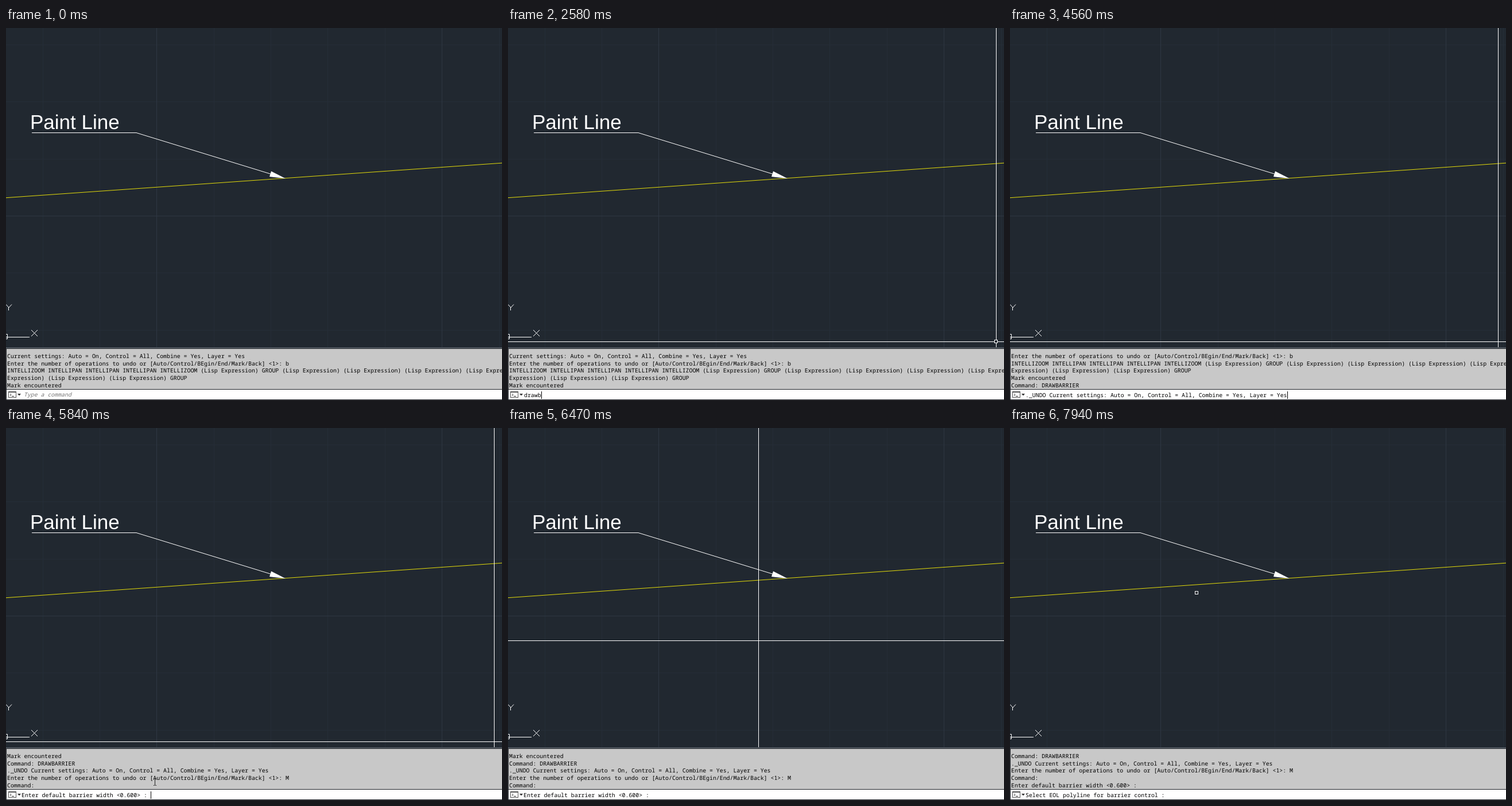
Write an HTML page with a canvas that moves like this. It is 864 px wide and 648 px high and loops after 8 s.

```html
<!DOCTYPE html>
<html lang="en">
<head>
<meta charset="utf-8">
<title>Draw barrier command</title>
<style>
  html, body { margin: 0; width: 100%; height: 100%; overflow: hidden; background: #212830; }
  canvas { display: block; }
</style>
</head>
<body>
<canvas id="stage" width="864" height="648"></canvas>
<script>
const ctx = document.getElementById('stage').getContext('2d');
const W = 864, VIEW_H = 556, LOOP = 8000, STEP = 70;
const MONO = '9.87px "Noto Sans Mono", "DejaVu Sans Mono", monospace';

const SETTINGS = 'Current settings: Auto = On, Control = All, Combine = Yes, Layer = Yes';
const UNDO = 'Enter the number of operations to undo or [Auto/Control/BEgin/End/Mark/Back] <1>: ';
const WIDTH_PROMPT = 'Enter default barrier width <0.600> : ';
const LISP = '(Lisp Expression) ';
const HISTORY = [
  SETTINGS,
  UNDO + 'b',
  'INTELLIZOOM INTELLIPAN INTELLIPAN INTELLIPAN INTELLIZOOM ' + LISP + 'GROUP ' + LISP.repeat(4),
  'Expression) ' + LISP.repeat(2) + 'GROUP',
  'Mark encountered',
  'Command: DRAWBARRIER',
  '._UNDO ' + SETTINGS,
  UNDO + 'M',
  'Command:',
  WIDTH_PROMPT
];
const KEY_TIMES = [1780, 1980, 2180, 2310, 2580, 2710, 2970, 3170, 3370, 3470, 3570];
const PARKED = [850, 546];
const PICK_START = [438, 367];

function rect(x, y, w, h, color) {
  ctx.fillStyle = color;
  ctx.fillRect(x, y, w, h);
}

function path(points, color = '#fff', fill = false) {
  ctx.beginPath();
  points.forEach(([x, y]) => ctx.lineTo(x, y));
  ctx.fillStyle = ctx.strokeStyle = color;
  ctx.lineWidth = 1;
  if (fill) ctx.fill(); else ctx.stroke();
}

function disc(x, y, r, color) {
  ctx.beginPath();
  ctx.arc(x, y, r, 0, 7);
  ctx.fillStyle = color;
  ctx.fill();
}

function text(string, x, y, color = '#000', font = MONO) {
  ctx.font = font;
  ctx.fillStyle = color;
  ctx.fillText(string, x, y);
}

const mix = (a, b, p) => a.map((v, i) => Math.round(v + (b[i] - v) * p));
const ease = p => p * p * (3 - 2 * p);

function drawGrid() {
  rect(0, 0, W, VIEW_H, '#212830');
  const line = (i, vertical, major) => {
    const at = Math.round((vertical ? 63.7 : 29) + i * 99.35);
    const color = major ? '#2e3742' : '#252d37';
    if (vertical) rect(at, 0, 1, VIEW_H, color);
    else rect(0, at, W, 1, color);
  };
  for (const major of [false, true]) {
    for (let i = 0; i < 9; i++) if ((i % 5 === 2) === major) line(i, true, major);
    for (let i = 0; i < 6; i++) if ((i === 3) === major) line(i, false, major);
  }
}

function drawDrawing() {
  path([[0, 295.7], [W, 235.2]], '#e2da0a');
  text('Paint Line', 42, 176, '#fff', '35px "Liberation Sans", Arial, sans-serif');
  path([[45, 182.5], [227, 182.5], [465, 255.5]]);
  path([[462, 249.5], [459, 259], [487, 262.3]], '#fff', true);
  // axis icon
  path([[0, 481.5], [5, 487], [10, 481.5]]);
  path([[4.5, 487], [4.5, 492]]);
  path([[44, 526], [55, 537]]);
  path([[55, 526], [44, 537]]);
  path([[0, 538.5], [41, 538.5]]);
  path([[0, 533.5], [2.5, 533.5], [2.5, 541.5], [0, 541.5]]);
}

function drawPickbox([x, y]) {
  ctx.strokeStyle = '#fff';
  ctx.lineWidth = 1;
  ctx.strokeRect(x - 2.5, y - 2.5, 5, 5);
}

function drawCrosshair([x, y], withBox) {
  const gap = withBox ? 3 : 0;
  rect(x, 0, 1, y - gap, '#fff');
  rect(x, y + gap, 1, VIEW_H - y - gap, '#fff');
  rect(0, y, x - gap, 1, '#fff');
  rect(x + gap, y, W - x - gap, 1, '#fff');
  if (withBox) drawPickbox([x, y]);
}

function drawPanel(first) {
  rect(0, 556, W, 1, '#3b434c');
  rect(0, 557, W, 1, '#666c73');
  rect(0, 558, W, 90, '#20242a');
  rect(1, 559, W, 70, '#c8c8c8');
  rect(1, 630, W, 17, '#fff');
  HISTORY.slice(first, first + 5).forEach((s, i) => text(s, 2, Math.round(575 + 12.65 * i)));
  // console button
  ctx.strokeStyle = '#555';
  ctx.strokeRect(4.5, 633.5, 13, 10);
  rect(4, 633, 14, 2, '#555');
  path([[7, 637], [9, 639], [7, 641]], '#333');
  rect(10, 641, 4, 1, '#333');
  path([[20, 637], [26, 637], [23, 640.5]], '#333', true);
}

function drawInput(string, x, caret) {
  text(string, x, 643);
  if (caret) rect(Math.floor(x + ctx.measureText(string).width + 1), 633, 1, 13, '#000');
}

function drawSuggestion() {
  rect(1, 607, 270, 23, '#242b36');
  text('DRAWBARRIER', 21, 623, '#fff');
  disc(243, 618.5, 6.3, '#fff');
  text('?', 240, 622.5, '#242b36', 'bold 10px "Open Sans", sans-serif');
  disc(258.5, 617.5, 5.5, '#2f7fb5');
  ctx.strokeStyle = '#242b36';
  ctx.beginPath();
  ctx.ellipse(258.5, 617.5, 2.5, 5.5, 0, 0, 7);
  ctx.stroke();
  path([[253, 617.5], [264, 617.5]], '#242b36');
  path([[261, 620], [265, 624]], '#a9b4be');
}

function drawBeam([x, y]) {
  rect(x, y - 5, 1, 11, '#222');
  rect(x - 2, y - 6, 2, 1, '#222');
  rect(x + 1, y - 6, 2, 1, '#222');
  rect(x - 2, y + 6, 2, 1, '#222');
  rect(x + 1, y + 6, 2, 1, '#222');
}

function pointerAt(t) {
  const s = 5490 + Math.floor((t - 5490) / STEP) * STEP;
  if (s < 5840) return mix([236, 641], [259, 616], (s - 5490) / 350);
  if (s < 6540) return mix([259, 616], [436, 370], ease(Math.min(1, (s - 5840) / 630)));
  return PICK_START;
}

function drawPointer(t) {
  if (t >= 6860) {
    const p = Math.max(0, Math.min(6, Math.floor((t - 7590) / STEP) + 1)) / 6;
    drawPickbox(mix(PICK_START, [325, 287], p ** 1.3));
  } else if (t >= 5490) {
    const pos = pointerAt(t);
    const inView = pos[1] < VIEW_H;
    drawCrosshair(inView ? pos : PARKED, false);
    if (!inView) drawBeam(pos);
  } else if (t >= 1710) {
    drawCrosshair(PARKED, t < 4490);
  } else if (t >= 140 && t < 190) {
    path([[861.5, 636], [861.5, 648], [W, 645], [W, 638.5]], '#000');
  }
}

function drawCommand(t) {
  if (t < 1780) text('Type a command', 31, 642, '#777', 'italic ' + MONO);
  else if (t < 4160) drawInput('drawbarrier'.slice(0, KEY_TIMES.filter(k => k <= t).length), 28, true);
  else if (t < 4560) drawInput('', 28, true);
  else if (t < 4630) drawInput('._UNDO ' + SETTINGS, 27, true);
  else if (t < 6860) drawInput(WIDTH_PROMPT, 27, t < 6220 && Math.floor((t - 4630) / 530) % 2 === 0);
  else drawInput('Select EOL polyline for barrier control :', 27, false);
  if (t >= 4030 && t < 4160) drawSuggestion();
}

function render(t) {
  drawGrid();
  drawDrawing();
  drawPanel(t < 4490 ? 0 : t < 4630 ? 1 : t < 6860 ? 4 : 5);
  drawCommand(t);
  drawPointer(t);
}

ctx.textRendering = 'geometricPrecision';
const start = performance.now();
(function tick() {
  render((performance.now() - start) % LOOP);
  requestAnimationFrame(tick);
})();
</script>
</body>
</html>
```
